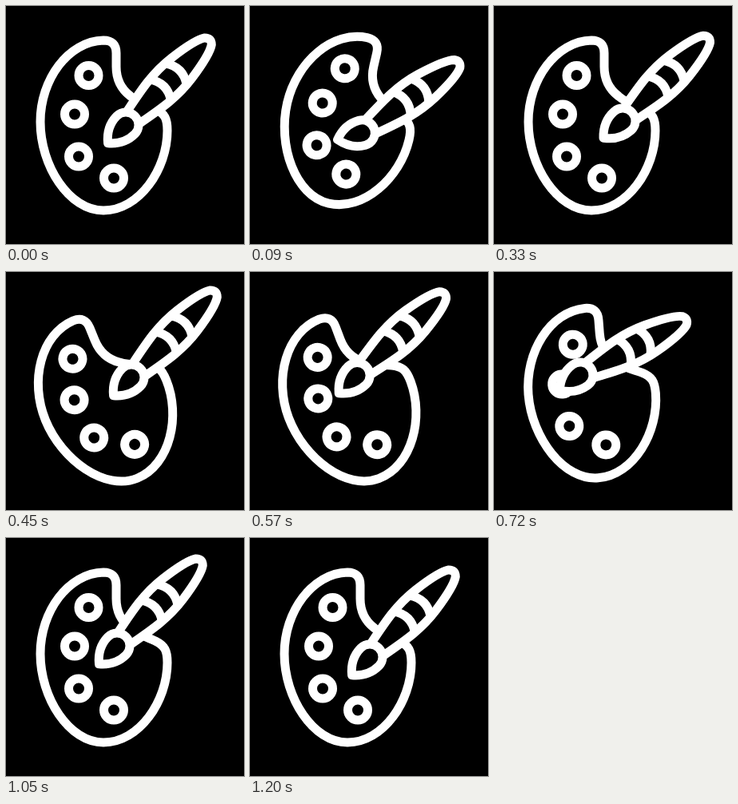
An HTML page for the animation above (1.5 s loop, 298 by 298 pixels).

```html
<!DOCTYPE html>
<html lang="en">
<head>
<meta charset="utf-8">
<title>Palette and brush</title>
<style>
  html, body { margin: 0; width: 100%; height: 100%; overflow: hidden; background: #000; }
  svg { display: block; width: 100%; height: 100%; }
</style>
</head>
<body>
<svg viewBox="0 0 298 298" fill="#000" stroke="#fff" stroke-width="11" stroke-linejoin="round" stroke-linecap="round">
  <g id="palette">
    <path d="M122 43C78 44 43 92 43 145C43 200 79 256 122 256C167 256 202 204 202 156C202 141 199 135 187 129C176 124 165 121 156 113C144 104 138 92 138 76V59Q138 43 122 43Z"/>
    <circle cx="103.500" cy="87" r="12.500"/>
    <circle cx="86" cy="135.500" r="12.500"/>
    <circle cx="91" cy="188.500" r="12.500"/>
    <circle cx="135" cy="215.500" r="12.500"/>
  </g>
  <g id="brush">
    <path d="M14 -11C45 -17 70 -22 100 -18C122 -15 140 -11 147 -6Q153 0 147 6C140 11 122 15 100 18C70 22 45 17 14 11Z"/>
    <path fill="none" d="M62 -18Q74 0 62 18M90 -18Q102 0 90 18"/>
    <path id="bristles" d="M-32 0C-22 -12 -11 -16 0 -16A16 16 0 0 1 0 16C-11 16 -22 12 -32 0Z"/>
  </g>
</svg>
<script>
  const LOOP = 1500, STEP = 30;
  const [palette, brush, bristles] = ['palette', 'brush', 'bristles'].map(id => document.getElementById(id));

  // the brush's way over the palette: time, x, y
  const path = [
    [0, 150, 149], [210, 127.5, 173], [330, 161, 144], [450, 157, 132],
    [720, 108, 129], [930, 115, 130], [1080, 144, 137], [1200, 150, 149]
  ];

  const progress = (t, from, to) => Math.min(1, Math.max(0, (t - from) / (to - from)));
  const ease = (t, from, to) => (1 - Math.cos(Math.PI * progress(t, from, to))) / 2;
  // rises from 0 to 1 and falls back
  const hump = (t, from, to) => Math.sin(Math.PI * progress(t, from, to)) ** 2;

  // Hermite curve through the path's points, at rest at both ends
  function along(t, axis) {
    const i = Math.min(path.length - 2, path.findLastIndex(p => p[0] <= t));
    const [a, b] = [path[i], path[i + 1]];
    const span = b[0] - a[0], u = progress(t, a[0], b[0]), v = 1 - u;
    const slope = n => {
      const p = path[n - 1], q = path[n + 1];
      return p && q ? (q[axis] - p[axis]) / (q[0] - p[0]) * span : 0;
    };
    return a[axis] * v * v * (1 + 2 * u) + b[axis] * u * u * (1 + 2 * v)
      + slope(i) * u * v * v - slope(i + 1) * u * u * v;
  }

  function draw(now) {
    const t = Math.floor(now % LOOP / STEP) * STEP;
    const firstStroke = hump(t, 0, 360), secondStroke = hump(t, 520, 940);
    const tilt = 24 * (ease(t, 0, 170) - 2 * ease(t, 170, 490) + ease(t, 490, 812));
    const angle = -45.5 + 19 * firstStroke + 18 * secondStroke;
    const bend = 41 * firstStroke - 9 * secondStroke;
    palette.setAttribute('transform', `rotate(${tilt} 149 149)`);
    brush.setAttribute('transform', `translate(${along(t, 1)} ${along(t, 2)}) rotate(${angle})`);
    bristles.setAttribute('transform', `rotate(${bend})`);
  }

  const start = performance.now();
  (function tick() {
    draw(performance.now() - start);
    requestAnimationFrame(tick);
  })();
</script>
</body>
</html>
```
